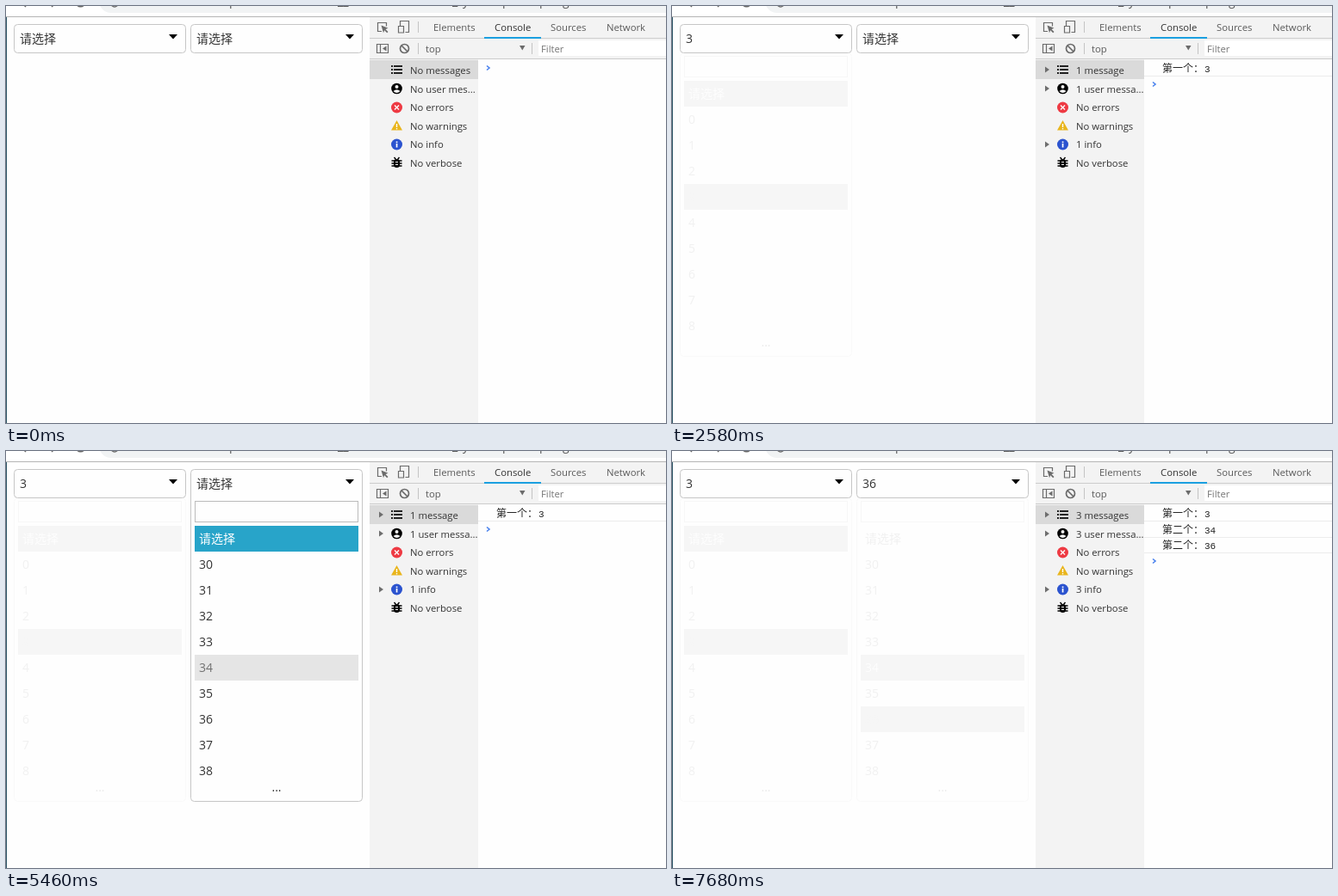
Recreate the animation shown at these times as an HTML page. Size 766x485 px, loop 8 s.

```html
<!DOCTYPE html>
<html lang="zh">
<meta charset="utf-8">
<title>Select demo</title>
<style>
  html, body { margin: 0; width: 100%; height: 100%; overflow: hidden; background: #fefefe; }
  svg { display: block; }
  text { font: 14px 'Open Sans', 'Noto Sans CJK SC', 'Noto Sans CJK', sans-serif; fill: #333; white-space: pre; }
  .ui text { font-size: 11.3px; }
  .log text { font: 12px 'Noto Sans CJK SC', 'Noto Sans CJK', sans-serif; fill: #222; }
  .log text.num { font: 11px 'Liberation Mono', monospace; }
</style>
<svg id="stage" width="766" height="485" viewBox="0 0 766 485"></svg>
<script>
const LOOP = 8000, STEP = 60, FADE = 300;
const stage = document.getElementById('stage');

const clamp = v => Math.max(0, Math.min(1, v));
const mix = (a, b, k) => Math.round(a + (b - a) * k);
const gray = v => `rgb(${v},${v},${v})`;
const rect = (x, y, w, h, fill, more = '') =>
  `<rect x="${x}" y="${y}" width="${w}" height="${h}" fill="${fill}" ${more}/>`;
const box = (x, y, w, h, line, r = 0, fill = '#fefefe') =>
  rect(x + .5, y + .5, w - 1, h - 1, fill, `stroke="${line}" rx="${r}"`);
const text = (x, y, s, more = '') => `<text x="${x}" y="${y}" ${more}>${s}</text>`;
const fill = (d, color) => `<path d="${d}" fill="${color}"/>`;
const line = (d, color, w = 1) => `<path d="${d}" fill="none" stroke="${color}" stroke-width="${w}"/>`;
const disc = (x, y, r, color) => `<circle cx="${x}" cy="${y}" r="${r}" fill="${color}"/>`;

// Hover strength of a row entered at `from` and left at `to`
function hoverLevel(t, from, to = Infinity) {
  const rise = clamp((Math.min(t, to) - from) / FADE);
  return t < to ? rise : Math.max(0, rise - (t - to) / FADE);
}

const sweep = [0, 1, 2, 3].map(i => [i + 1, 5130 + i * 60, 5190 + i * 60]);
const selects = [
  { x: 9, first: 0, views: [
    { open: 960, close: 2580, caret: 1030, selected: 0, hovers: [[4, 1966]], value: '3' }] },
  { x: 214, first: 30, views: [
    { open: 4680, close: 5880, caret: 4680, selected: 0, hovers: [...sweep, [5, 5370]], value: '34' },
    { open: 6900, close: 7680, caret: 6900, selected: 5, hovers: [[7, 7329]], value: '36' }] },
];
const logs = [[2580, '第一个', 3], [5880, '第二个', 34], [7680, '第二个', 36]];

function panel(x, first, view, t, faded) {
  let s = box(x + 5, 58, 190, 25, '#bbb');
  if (!faded && Math.floor((t - view.caret) / 530) % 2 === 0) s += rect(x + 10, 63, 1, 15, '#000');
  for (let i = 0; i < 10; i++) {
    const y = 87 + i * 30, label = i ? first + i - 1 : '请选择';
    const hover = view.hovers.find(h => h[0] === i);
    const k = hover ? hoverLevel(t, hover[1], hover[2]) : 0;
    const on = i === view.selected;
    if (on) s += rect(x + 5, y, 190, 30, faded ? '#aaa' : '#28a4c9');
    else if (k) s += rect(x + 5, y, 190, 30, gray(mix(254, 169, k)));
    const ink = on ? '#fff' : gray(mix(faded ? 119 : 51, faded ? 169 : 255, k));
    s += text(x + 10, y + 20, label, `style="fill:${ink}"`);
  }
  return s + text(x + 100, 396, '...', 'text-anchor="middle"');
}

function select({ x, first, views }, t) {
  const view = views.filter(v => t >= v.open).pop();
  const open = view && t < view.close;
  const done = views.filter(v => t >= v.close).pop();
  let s = '';
  // A closed list leaves a very faint afterimage
  if (view && !open)
    s += `<g opacity=".09">${box(x, 54, 200, 354, '#ccc', 4)}${panel(x, first, view, t, true)}</g>`;
  s += box(x, 21, 200, open ? 387 : 34, '#c6c6c6', 4);
  if (open) s += panel(x, first, view, t, false);
  return s + text(x + 7, 43, done ? done.value : '请选择')
    + fill(`M${x + 180} 33h10l-5 5.5z`, '#000');
}

function browserEdge() {
  const tails = [[259, 'p'], [385, '__'], [518, '_'], [530, 'y'], [576, 'p'], [619, 'p'], [646, 'g']];
  return rect(0, 0, 766, 12, '#fff')
    + rect(108, -20, 690, 28, '#f1f3f4', 'rx="14"')
    + tails.map(([x, s]) => text(x, -1, s, 'style="fill:#555"')).join('')
    + line('M20 -2l3 3M53 1l3 -3M82 -2a5 5 0 0 0 9 0M122 -3a4 4 0 0 0 8 0', '#666', 1.5)
    + rect(0, 12, 766, 1, '#b5b5b5')
    + rect(0, 13, 1, 472, '#2c5566');
}

function toolbars(t) {
  const tabs = [['Elements', 496], ['Console', 567], ['Sources', 632], ['Network', 697]];
  const hot = t >= 240 && t < 300 ? 3 : t >= 300 && t < 420 ? 2 : 1;
  const sep = (x, y) => rect(x, y, 1, 13, '#c4c4c4');
  const icon = '#6b6b6b';
  return rect(422, 13, 344, 49, '#f3f3f3') + rect(422, 37, 344, 1, '#ccc') + rect(422, 61, 344, 1, '#ccc')
    + line('M436 29.5h-4.5v-10h10v4', icon, 1.2) + fill('M435.5 22.5l8 3.2-3 1.2 3 3-1.3 1.3-3-3-1.2 3z', icon)
    + line('M457.5 23v-5.500h10v13h-4', icon, 1.2) + line('M455.500 23.500h6v7.500h-6z', icon, 1.2)
    + sep(478, 18)
    + tabs.map(([s, x], i) =>
        text(x, 29, s, `style="fill:${i === 1 || i === hot ? '#333' : '#5a5a5a'}"`)).join('')
    + rect(555, 36, 66, 2, '#1a9fe0')
    + line('M430.500 44.500h13v10h-13zM434.500 44.500v10', icon, 1.2) + fill('M441.500 46.500v6l-4.500-3z', icon)
    + `<circle cx="462.500" cy="49.500" r="5" fill="none" stroke="${icon}" stroke-width="1.700"/>`
    + line('M459 46l7 7', icon, 1.7)
    + sep(478, 43) + text(487, 54, 'top', 'style="fill:#5a5a5a"')
    + fill('M596 46h6.500l-3.250 5.500z', icon) + sep(610, 43)
    + rect(618, 40, 148, 18, '#fff') + text(621, 54, 'Filter', 'style="fill:#757575"');
}

const sideIcons = [
  y => [-4, 0, 4].map(d => rect(447, y + d - 1, 2, 2, '#222') + rect(450, y + d - 1, 10, 2, '#222')).join(''),
  y => disc(453.5, y, 6.3, '#000') + disc(453.5, y - 2, 2, '#f3f3f3')
    + fill(`M449.500 ${y + 3}q4 -3.500 8 0q-4 4 -8 0z`, '#f3f3f3'),
  y => disc(453.5, y, 6.5, '#ee3a43') + line(`M451 ${y - 2.5}l5 5m0 -5l-5 5`, '#fff', 1.4),
  y => fill(`M453.500 ${y - 6}l6.500 11.500h-13z`, '#e9b51c')
    + rect(452.8, y - 2, 1.4, 4, '#fff') + rect(452.8, y + 3, 1.4, 1.4, '#fff'),
  y => disc(453.5, y, 6.5, '#2b53cf') + rect(452.7, y - 3.5, 1.7, 1.7, '#fff')
    + rect(452.7, y - 1, 1.7, 4.5, '#fff'),
  y => rect(450, y - 4, 7, 10, '#000', 'rx="3.500"')
    + line(`M447.500 ${y - 2}h12M447.500 ${y + 1}h12M447.500 ${y + 4}h12M450.500 ${y - 6}l2 2.500M456.500 ${y - 6}l-2 2.500`, '#000', 1.4)
    + rect(452, y - 1, 3, 1, '#f3f3f3') + rect(452, y + 2, 3, 1, '#f3f3f3'),
];

function sidebar(n) {
  const labels = [
    n ? `${n} message${n > 1 ? 's' : ''}` : 'No messages',
    n ? `${n} user messa...` : 'No user mes...',
    'No errors', 'No warnings', `${n || 'No'} info`, 'No verbose'];
  let s = rect(422, 62, 126, 423, '#f3f3f3') + rect(422, 63, 126, 22, '#dadada');
  labels.forEach((label, i) => {
    const y = 74.3 + i * 21.6;
    s += sideIcons[i](Math.round(y)) + text(469, Math.round(y + 4.6), label);
    if (n && [0, 1, 4].includes(i)) s += fill(`M433 ${Math.round(y) - 3.5}v7l5-3.500z`, '#6e6e6e');
  });
  return s;
}

function consoleLog(shown) {
  let s = rect(548, 62, 218, 423, '#fefefe');
  shown.forEach(([, label, value], i) => {
    const y = Math.round(77 + i * 18.5);
    s += text(569, y, label + '：') + text(618, y, value, 'class="num"')
      + rect(548, y + 4, 218, 1, '#ececec');
  });
  const y = Math.round(72.3 + shown.length * 18.5);
  return s + line(`M558 ${y - 2.5}l3 2.500l-3 2.500`, '#4a82ee', 1.6);
}

function draw(t) {
  const shown = logs.filter(l => t >= l[0]);
  return rect(0, 0, 766, 485, '#fefefe') + browserEdge()
    + selects.map(s => select(s, t)).join('')
    + `<g class="ui">${toolbars(t)}${sidebar(shown.length)}</g>`
    + `<g class="log">${consoleLog(shown)}</g>`;
}

let last = -1;
function tick() {
  const t = Math.floor(performance.now() % LOOP / STEP) * STEP;
  if (t !== last) stage.innerHTML = draw(last = t);
  requestAnimationFrame(tick);
}
tick();
</script>
</html>
```
